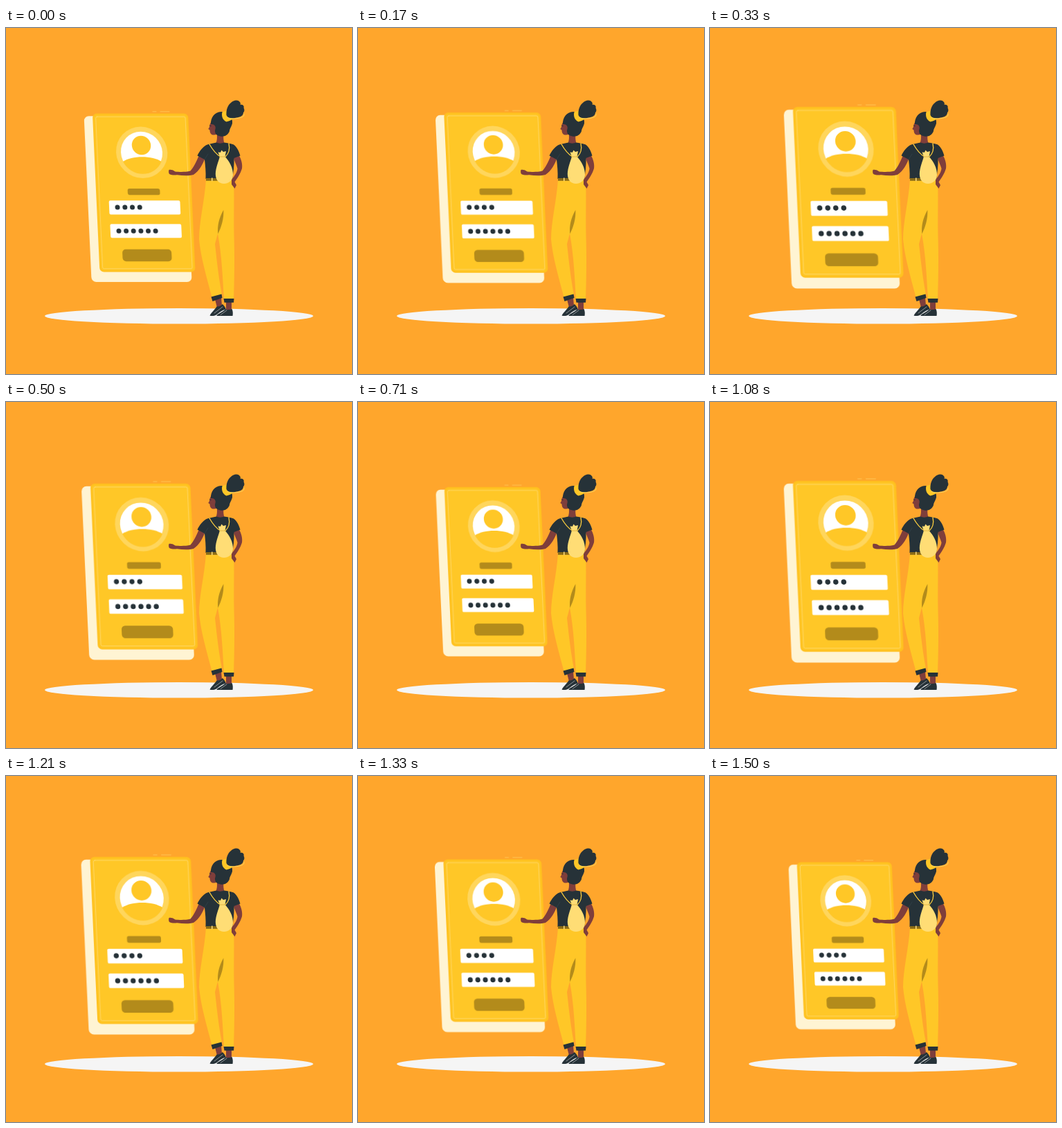
An HTML page for the animation above (1540 ms loop, 500 px wide and 500 px high).

```html
<!DOCTYPE html>
<html lang="en">
<head>
<meta charset="utf-8">
<title>Login card</title>
<style>
  html, body { margin: 0; width: 100%; height: 100%; overflow: hidden; background: #ffa62c; }
  svg { display: block; width: 100%; height: 100%; }
  .dark { fill: #263238; }
  .skin { fill: #7f3e3b; }
  .gold { fill: #ffc727; }
  .olive { fill: #b38b1b; }
  .white { fill: #fff; }
  .line { fill: none; stroke-linecap: round; stroke-linejoin: round; }

  /* Two quick swells with slower falls */
  #card {
    transform-origin: 193px 245px;
    animation: beat 1540ms linear infinite;
  }
  @keyframes beat {
    0% { transform: scale(1); }
    1.95% { transform: scale(.993); }
    4.9% { transform: scale(.99); }
    9.4% { transform: scale(1); }
    21.43% { transform: scale(1.077); }
    24.4% { transform: scale(1.087); }
    32.47% { transform: scale(1.046); }
    38.6% { transform: scale(1.025); }
    47.7% { transform: scale(1); }
    49.7% { transform: scale(.993); }
    52.6% { transform: scale(.99); }
    57.14% { transform: scale(1); }
    70.13% { transform: scale(1.078); }
    72.1% { transform: scale(1.087); }
    80.2% { transform: scale(1.046); }
    86.36% { transform: scale(1.025); }
    95.4% { transform: scale(1); }
    97.4% { transform: scale(.992); }
    100% { transform: scale(.99); }
  }
</style>
</head>
<body>
<svg viewBox="0 0 500 500">
  <ellipse cx="250" cy="416.3" rx="194" ry="11.3" fill="#f5f5f5"/>

  <g id="card">
    <path class="line" d="M212 120.8h5M223 120.8h13" stroke="#ffd166" stroke-width=".7"/>
    <g transform="matrix(1 0 .046 1 -11.27 0)">
      <rect x="118" y="127.2" width="145" height="239.8" rx="7" fill="#fff4d3"/>
      <rect x="130.5" y="123.5" width="138.2" height="229" rx="6" fill="#ffc11f"/>
      <rect class="gold" x="132.5" y="125.5" width="134.2" height="225" rx="5"/>
      <rect class="line" x="135" y="128.2" width="129.4" height="219.6" rx="2" stroke="#ffdc78" stroke-width=".7"/>
      <circle cx="199.2" cy="179.8" r="37.2" fill="#ffd65c"/>
      <circle class="white" cx="199" cy="179.8" r="30"/>
      <circle class="gold" cx="199" cy="169.5" r="13.7"/>
      <path class="gold" d="M171.5 193C184 184 215 184 227 193A30.5 30.5 0 0 1 171.5 193Z"/>
      <rect class="olive" x="176.2" y="232" width="46.6" height="9.2" rx="2.5"/>
      <rect class="white" x="148.4" y="249.4" width="102.8" height="20.2" rx="2"/>
      <rect class="white" x="148.6" y="283.2" width="102.8" height="20.2" rx="2"/>
      <path class="line" d="M160.4 259h0M171.2 259h0M181.9 259h0M192.6 259h0M160.8 293.3h0M171.4 293.3h0M182 293.3h0M192.7 293.3h0M203.3 293.3h0M213.9 293.3h0" stroke="#263238" stroke-width="7"/>
      <rect class="olive" x="164.5" y="319.8" width="71" height="17.4" rx="5"/>
    </g>
  </g>

  <g id="woman">
    <!-- feet -->
    <path class="skin" d="M302 392L311 389L312 401L305 404ZM318 395H326V408H318Z"/>
    <path class="dark" d="M304.500 402.500C308 403 311 401 313 399C315 401 317 404 318 406.500C313 407.500 310 410 306 413C302 416.500 297 416.500 294.500 415.500C296 412 301 408 304.500 402.500Z"/>
    <path class="dark" d="M317 406.500C320 407.500 324 407 326.500 406C328 409 328 413 327.500 416H304.500C304 413.500 312 411.500 317 406.500Z"/>
    <path class="line" d="M301 412L313 403M310 414.500L319 408" stroke="#f5f5f5" stroke-width=".5"/>

    <!-- trousers -->
    <path class="gold" d="M289 219L329 219C330 240 329 270 329.500 300C330.500 330 330 365 329 392H315C313 360 312 330 306 297L302 312C305 340 308 365 312 385L297.500 389C290 360 281 330 279 305C279 280 287 250 289 219Z"/>
    <path class="olive" d="M314.300 263C308 274 305 286 306.300 297.500C311 288 315 276 314.300 263Z"/>
    <path class="dark" d="M296.500 388.500L311.500 384.500L312.500 390L298.500 395ZM314.500 391H329.500L329 396.800H315.500Z"/>

    <!-- arms -->
    <path class="skin" d="M279 184C275 193 271 202 266.500 206.500C259 208.500 250 208 244.500 207.500C241 205 238 204.500 235.500 205C234.800 207 235 209.500 236 211C239 212.500 243 212.800 247 212.300C256 213.500 265 213.800 271 212C279 207 285 196 288.500 186Z"/>
    <path class="skin" d="M328 186L337 184.500C340 190 342 197 341 203C339 210 334.500 217 330.500 222.500L333 227L330.500 232L326 226V219C331 213 334 208 334.500 203C333 198 330 192 328 186Z"/>

    <!-- top and belt -->
    <path class="skin" d="M304.500 152H314.500C314 158 314 163 316 168C312 171.500 306 170.500 302.500 168C305 164 305.500 158 304.500 152Z"/>
    <path class="dark" d="M291 168.500C296 167 301 166 304.500 165.500C307 167 312 167 315 165.500C320 166 325 167 329 168.500C334 172 337 179 338.500 184.500L329.500 188C330 198 328.500 209 327 218H288.500C289 208 288 199 287 190L276.500 184.500C280 177 285 171 291 168.500Z"/>
    <path class="line" d="M287 190L292 182" stroke="#384a52" stroke-width=".5"/>
    <path d="M289 217H306.500V220.800H289Z" fill="#8a6b16"/>
    <path d="M297 216.500H298.500V221.200H297Z" fill="#ffe082"/>

    <!-- backpack -->
    <path class="line" d="M294 168C298 175 303 182 310 186M322 167C323.500 174 322.500 181 317 186" stroke="#ffd03f" stroke-width="1.3"/>
    <path d="M309 185.500H316C323 192 328.500 203 328 213C327.500 221 321 225 315 225C308 225 303 220 302.800 211C303 202 307 193 309 185.500Z" fill="#ffdd75"/>
    <path d="M309 186L306.500 179.500L310 179.800L311.500 176.500L314 179L318 178L316.500 186Z" fill="#ffdd75"/>
    <path class="line" d="M308.500 186H317" stroke="#d9ae3a" stroke-width=".8"/>

    <!-- head -->
    <path class="skin" d="M297 135C294.500 138 294 141 294 143L292.300 146L294.500 147.500C294.500 151 296 154.300 299 154.500C303 155 307 153 309 149L308 136Z"/>
    <path class="dark" d="M296 139C295.500 130 301 121.500 311 121C320 121 328 128 327 138C325.500 143 323 146 323 149C321 155 315 157.500 310 156.500C304 156 300.500 151 302.500 146C303.500 142 301 138.500 296 139Z"/>
    <path class="line" d="M294.500 141L296.500 141.500" stroke="#263238" stroke-width=".8"/>
    <path class="gold" d="M312.500 121.200C311 127 313 133 318.500 135.500C322 135 326 132.500 329 131L320 119Z"/>
    <path class="dark" d="M318.500 126C318 119 320 112 325 108C329 104 335 103 338 107C339 108.500 339 110 338.500 111C342 110 344.500 112.500 343.500 115.500C345 118 344.500 121 343 122C343 127 338 129 333 129.500C327 131.500 320.500 131 318.500 126Z"/>
    <path class="line" d="M320 129.500C328 132.500 338 130.500 342.500 128C344 126.800 344.300 125.500 343.800 124" stroke="#ffd65c" stroke-width="1"/>
  </g>
</svg>
</body>
</html>
```
